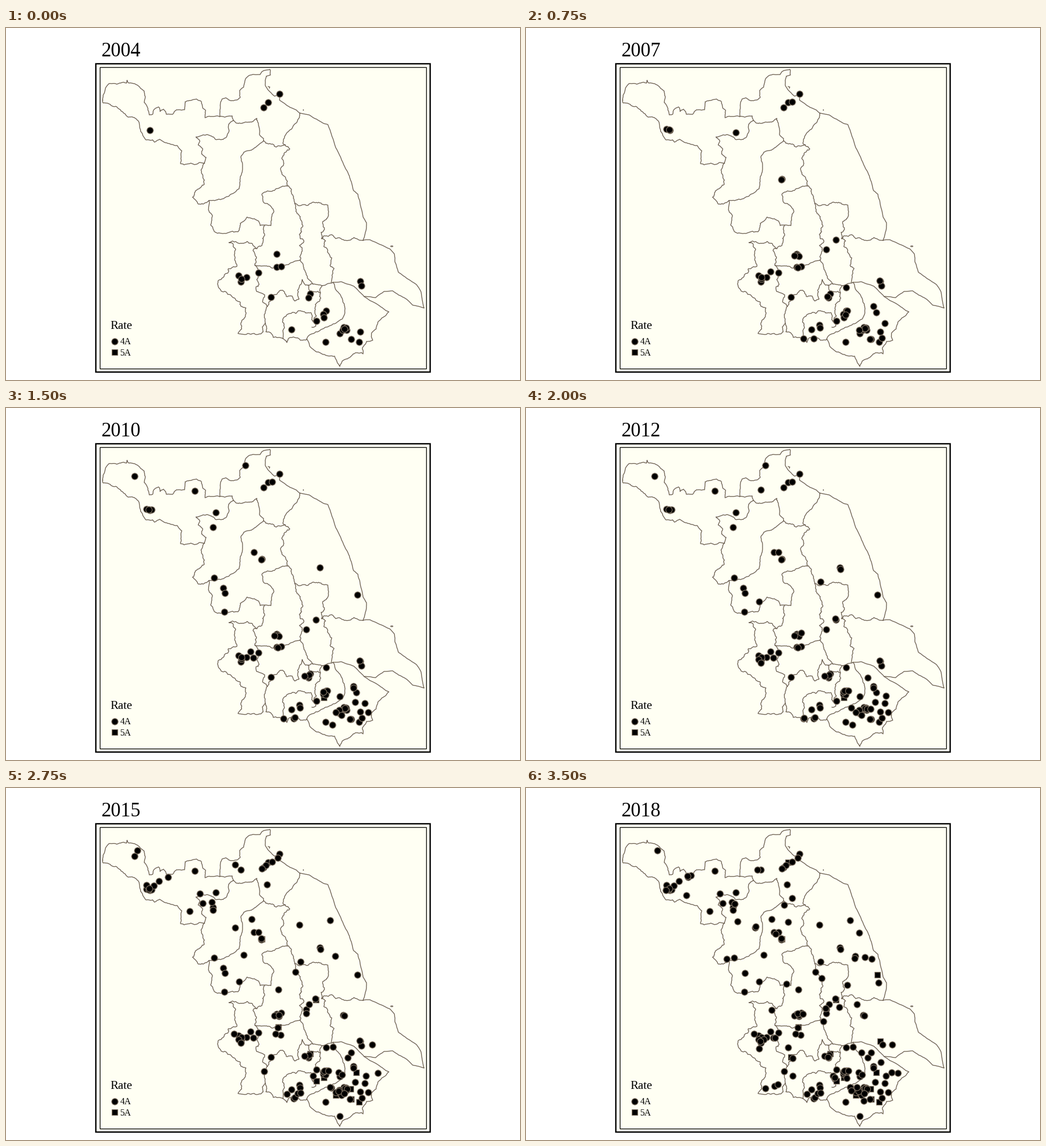
Write a matplotlib script that moves like this. It is 904 by 620 pixels and loops after 3.75 s.

```python
import numpy as np
import matplotlib.pyplot as plt
from matplotlib.animation import FuncAnimation
from matplotlib.patches import Ellipse, Rectangle

W, H, DPI = 904, 620, 80
PT = 72 / DPI  # points per pixel
FIRST, YEARS = 2004, 15
IVORY, EARTH, EDGE = "#fffff3", "#695c50", "#7d7061"

rng = np.random.default_rng(7)
plt.rcParams["font.family"] = "Liberation Serif"

fig = plt.figure(figsize=(W / DPI, H / DPI), dpi=DPI, facecolor="white")
ax = fig.add_axes([0, 0, 1, 1])
ax.set(xlim=(0, W), ylim=(H, 0))
ax.axis("off")


def box(x0, y0, x1, y1, width, fill="none"):
    ax.add_patch(Rectangle((x0, y0), x1 - x0, y1 - y0, facecolor=fill,
                           edgecolor="black", linewidth=width * PT, joinstyle="miter"))


def label(x, y, text, size):
    return ax.text(x, y, text, fontsize=size * PT, va="baseline")


def marks(shape, size, x=(), y=()):
    line, = ax.plot(x, y, shape, markersize=size * PT, zorder=3,
                    markerfacecolor="black", markeredgecolor=EDGE,
                    markeredgewidth=1.25 * PT)
    return line


def roughen(pts, amount):
    """Subdivide a path, pushing each midpoint sideways by a random share."""
    for _ in range(3):
        step = np.diff(pts, axis=0)
        side = np.column_stack([-step[:, 1], step[:, 0]])
        mid = pts[:-1] + step / 2 + side * rng.normal(0, amount, (len(step), 1))
        out = np.empty((2 * len(pts) - 1, 2))
        out[::2], out[1::2] = pts, mid
        pts = out
    return pts


def border(*xy, rough=0.12):
    pts = roughen(np.array(xy, float).reshape(-1, 2), rough)
    ax.plot(pts[:, 0], pts[:, 1], color=EARTH, linewidth=1.3 * PT,
            solid_joinstyle="round", zorder=2)


def coast(*xy):
    border(*xy, rough=0.025)


box(158, 63, 746, 606, 2.4, IVORY)
box(165.3, 69.4, 739, 600, 1.3)

# north-west
border(170, 127, 171, 118, 176, 104, 181, 98, 195, 99, 204, 96, 212, 97, 213, 92,
       216, 97, 226, 98, 234, 103, 243, 111, 245, 121, 243, 131, 248, 138, 252, 153,
       258, 152, 261, 143, 268, 139, 271, 147, 277, 143, 282, 152, 293, 152, 300, 144,
       314, 144, 315, 130, 327, 127, 343, 129, 346, 141, 351, 145, 350, 158, 360, 156,
       376, 156, 385, 157, 398, 155, 400, 163, rough=0.07)
border(400, 163, 392, 169, 391, 175, 390, 186, 387, 193, 375, 196, 365, 192, 360, 190,
       334, 192, 340, 197, 338, 206, 346, 213, 344, 222, 352, 228, 349, 238, rough=0.08)
border(349, 238, 340, 237, 335, 240, 325, 238, 313, 241, 307, 239, 308, 228, 309, 216,
       301, 207, 290, 205, 280, 202, 270, 196, 261, 201, 258, 197, 246, 197, 241, 190,
       236, 178, 234, 166, 229, 160, 215, 157, 204, 147, 193, 138, 180, 133, 171, 132,
       170, 127, rough=0.07)

# northern coast
border(376, 156, 377, 140, 380, 125, 387, 123, 392, 127, 400, 128, 412, 122, 411, 110,
       418, 104, 421, 90, 427, 84, 447, 82, 450, 77, 458, 74, 464, 73, 465, 83, 458, 85,
       rough=0.07)
coast(458, 85, 456, 92, 456, 101, 460, 108, 466, 114, 472, 120, 482, 117, 481, 127,
      490, 133, 500, 140, 510, 144, 517, 150)
border(517, 150, 516, 158, 509, 168, 503, 177, 493, 186, 488, 196, 487, 203, 491, 206,
       rough=0.07)
border(400, 163, 412, 168, 425, 166, 434, 165, 441, 159, 444, 170, 446, 185, 453, 199,
       457, 203, 470, 205, 482, 208, 491, 206)

# east coast and its inland edge
coast(517, 150, 533, 153, 550, 163, 566, 170, 573, 190, 580, 211, 590, 232, 600, 252,
      607, 270, 611, 286, 619, 293, 624, 315, 628, 333, 634, 343, 632, 360, 628, 374)
border(628, 374, 612, 369, 595, 374, 580, 371, 573, 364, 560, 366, 555, 371, 554, 360,
       560, 352, 557, 341, 565, 335, 566, 312, 550, 307, 535, 309, 517, 313, 508, 309)
border(508, 309, 505, 296, 502, 284, 494, 278, 495, 270, 485, 257, 483, 247, 488, 235,
       487, 225, 499, 213, 491, 206)

# centre
border(453, 199, 445, 205, 432, 215, 418, 219, 413, 227, 416, 245, 412, 262, 410, 283,
       395, 293, 380, 301, 367, 304, 357, 304, rough=0.07)
border(349, 238, 343, 250, 349, 268, 343, 280, 333, 287, 328, 298, 338, 310, 347, 310,
       357, 304)
border(357, 304, 356, 320, 363, 330, 360, 347, 366, 358, 380, 362, 398, 358, 408, 359,
       412, 344, 424, 333, 437, 336, 447, 348, 466, 348, 467, 335, 471, 322, 464, 312,
       454, 308, 450, 293, 460, 287, 475, 283, 494, 278, rough=0.08)
border(455, 348, 455, 365, 452, 377, 444, 385, 437, 396, 440, 412, 438, 418)
border(508, 309, 512, 327, 520, 340, 519, 355, 516, 364, 524, 375, 521, 393, 517, 409,
       rough=0.15)

# great river and the eastern bank
border(438, 418, 455, 419, 468, 423, 485, 418, 500, 414, 517, 409, 522, 415, 524, 425,
       530, 440, 540, 451, 556, 454, 575, 448, rough=0.06)
border(555, 371, 562, 375, 559, 385, 568, 398, 573, 405, 570, 418, 575, 432, 572, 448)
coast(628, 374, 640, 373, 655, 380, 675, 389, 683, 398, 684, 412, 690, 430, 705, 441,
      722, 452, 730, 465, 735, 493)
coast(630, 473, 650, 475, 665, 464, 680, 463, 690, 470, 705, 478, 715, 488, 735, 493)

# south-west
border(440, 388, 434, 382, 424, 376, 413, 379, 400, 376, 392, 378, 404, 390, 403, 405,
       406, 420, 391, 424, 384, 435, 372, 451, 378, 463, 395, 470, 405, 480, 413, 490,
       422, 493, 420, 510, 413, 520, 408, 538, 425, 538, 440, 540, 452, 535)
border(438, 418, 444, 432, 441, 443, 445, 452, 440, 462, 455, 470, 453, 484, 460, 490,
       456, 500, 456, 520, 452, 535)
border(460, 490, 466, 478, 470, 470, 480, 465, 487, 462, 493, 473, 503, 472, 508, 481,
       515, 478, 513, 468, 516, 456, 521, 443, 526, 452, 532, 453, 534, 464, 545, 465,
       553, 466, 552, 480, 544, 487, 543, 498, 546, 507, 540, 517, 545, 525, 538, 527)
border(556, 454, 553, 466)
border(532, 453, 540, 451)
border(540, 517, 537, 502, 527, 502, 514, 498, 494, 505, 487, 515, 489, 525, 487, 547)
border(456, 520, 457, 535, 470, 545, 487, 547, 494, 554, 496, 548, 515, 547, 529, 548)

# south-east
border(529, 548, 545, 535, 562, 527, 580, 520, 592, 512, 596, 502, 595, 486, 588, 470,
       580, 461, 575, 448, rough=0.06)
border(529, 548, 534, 560, 545, 570, 560, 575, 578, 578, 582, 588, 587, 596, 592, 586,
       605, 580, 615, 572, 628, 574, 627, 563, 634, 552, 645, 550, 643, 537, 651, 530,
       654, 518, 673, 500, rough=0.07)
coast(575, 448, 590, 447, 600, 451, 612, 455, 621, 464, 630, 473, 640, 480, 655, 488,
      673, 500)

# islets
coast(461, 103, 464, 104, 463, 106)
for x, y, w, h in ((678.5, 384.5, 4, 1.6), (523, 144.5, 1, 1)):
    ax.add_patch(Ellipse((x, y), w, h, facecolor="none", edgecolor=EARTH, linewidth=1.1 * PT))

opened, promoted, closed = {}, {}, {}


def log(book, year, *xy):
    for spot in zip(xy[::2], xy[1::2]):
        book[spot] = year


log(opened, 2004, 253, 180, 481, 116, 461, 131, 453, 140, 476, 398, 476, 421, 484, 420,
    444, 431, 409, 436, 423, 439, 413, 447, 414, 442, 466, 474, 535, 468, 532, 475,
    563, 498, 558, 504, 559, 510, 546, 516, 502, 531, 587, 538, 592, 532, 594, 527,
    599, 532, 598, 528, 595, 530, 562, 553, 607, 548, 621, 553, 623, 535, 623, 446, 625, 454)
log(opened, 2005, 468, 130, 478, 400, 480, 402, 478, 422, 530, 473, 563, 457, 516, 523,
    517, 528, 565, 498, 562, 505, 596, 529)
log(opened, 2006, 247, 178, 369, 184, 450, 266, 545, 373, 414, 439, 616, 501, 631, 520,
    626, 546, 605, 548, 488, 547, 506, 547)
log(opened, 2007, 252, 179, 449, 267, 472, 401, 528, 390, 430, 429, 622, 445, 611, 490,
    586, 532)
log(opened, 2008, 421, 101, 618, 329, 384, 359, 435, 440, 533, 470, 611, 493, 508, 545,
    580, 536, 637, 536)
log(opened, 2009, 226, 120, 256, 179, 251, 179, 364, 210, 382, 317, 558, 500, 574, 558)
log(opened, 2010, 332, 146, 436, 254, 552, 281, 366, 299, 385, 326, 525, 472, 587, 508,
    614, 518, 590, 541)
log(opened, 2011, 413, 144, 444, 254, 544, 371, 484, 396, 409, 443, 560, 498, 572, 528,
    600, 530)
log(opened, 2012, 553, 284, 518, 306, 410, 341, 413, 449, 601, 475, 567, 498, 633, 507,
    606, 530, 489, 546)
log(opened, 2013, 403, 135, 478, 123, 247, 171, 341, 186, 403, 246, 516, 241, 593, 400,
    644, 452, 654, 502, 401, 433, 540, 507, 513, 538)
log(opened, 2014, 457, 136, 459, 170, 260, 172, 252, 177, 362, 201, 449, 265, 595, 401,
    479, 421, 480, 400, 483, 435, 585, 501, 570, 527, 585, 534, 580, 541, 595, 538, 422, 529)
log(opened, 2015, 231, 110, 269, 164, 285, 157, 346, 203, 364, 215, 323, 217, 450, 142,
    432, 231, 418, 294, 570, 233, 579, 296, 509, 324, 479, 355, 533, 381, 528, 397,
    474, 433, 575, 456, 607, 466, 454, 499, 546, 496, 591, 505, 494, 539, 518, 537, 587, 578)
log(opened, 2016, 290, 154, 246, 180, 282, 189, 367, 204, 372, 235, 468, 194, 439, 257,
    596, 298, 608, 301, 520, 335, 565, 347, 551, 386, 582, 381, 418, 443, 627, 452,
    531, 474, 624, 483, 469, 507, 543, 510, 564, 511, 643, 501, 437, 525, 572, 533)
log(opened, 2017, 407, 144, 454, 206, 404, 244, 586, 255, 620, 343, 458, 345, 478, 397,
    527, 388, 438, 440, 410, 459, 590, 466, 443, 522, 421, 529, 582, 527, 594, 551)
log(opened, 2018, 284, 155, 461, 236, 353, 301, 578, 300, 432, 391, 487, 398, 523, 411,
    412, 446, 461, 457, 469, 476)

log(promoted, 2009, 559, 510)
log(promoted, 2013, 621, 553, 545, 373, 606, 530)
log(promoted, 2014, 535, 468, 546, 516, 616, 501, 607, 548, 580, 541, 479, 421)
log(promoted, 2015, 450, 266)
log(promoted, 2016, 618, 329, 466, 474, 623, 446)
log(promoted, 2018, 461, 131)

log(closed, 2013, 574, 558)
log(closed, 2014, 484, 420, 476, 421, 488, 547, 489, 546)
log(closed, 2015, 421, 101, 422, 529)
log(closed, 2016, 622, 445, 625, 454)
log(closed, 2017, 403, 135, 226, 120)
log(closed, 2018, 382, 317)

DOT, SQUARE = 11.2, 10
squares = marks("s", SQUARE)
dots = marks("o", DOT)
marks("o", DOT, [190.5], [551.5])
marks("s", SQUARE, [190.5], [571])
label(183, 530, "Rate", 21)
label(200.5, 557, "4A", 16)
label(200.5, 577, "5A", 16)
title = label(167.5, 49.5, str(FIRST), 34.8)


def update(i):
    year = FIRST + i
    live = [s for s, start in opened.items() if start <= year < closed.get(s, 9999)]
    top = [s for s in live if promoted.get(s, 9999) <= year]
    plain = [s for s in live if s not in top]
    for line, spots in ((squares, top), (dots, plain)):
        line.set_data([x for x, _ in spots], [y for _, y in spots])
    title.set_text(str(year))
    return squares, dots, title


anim = FuncAnimation(fig, update, frames=YEARS, interval=250, repeat=True, repeat_delay=0)
plt.show()
```
